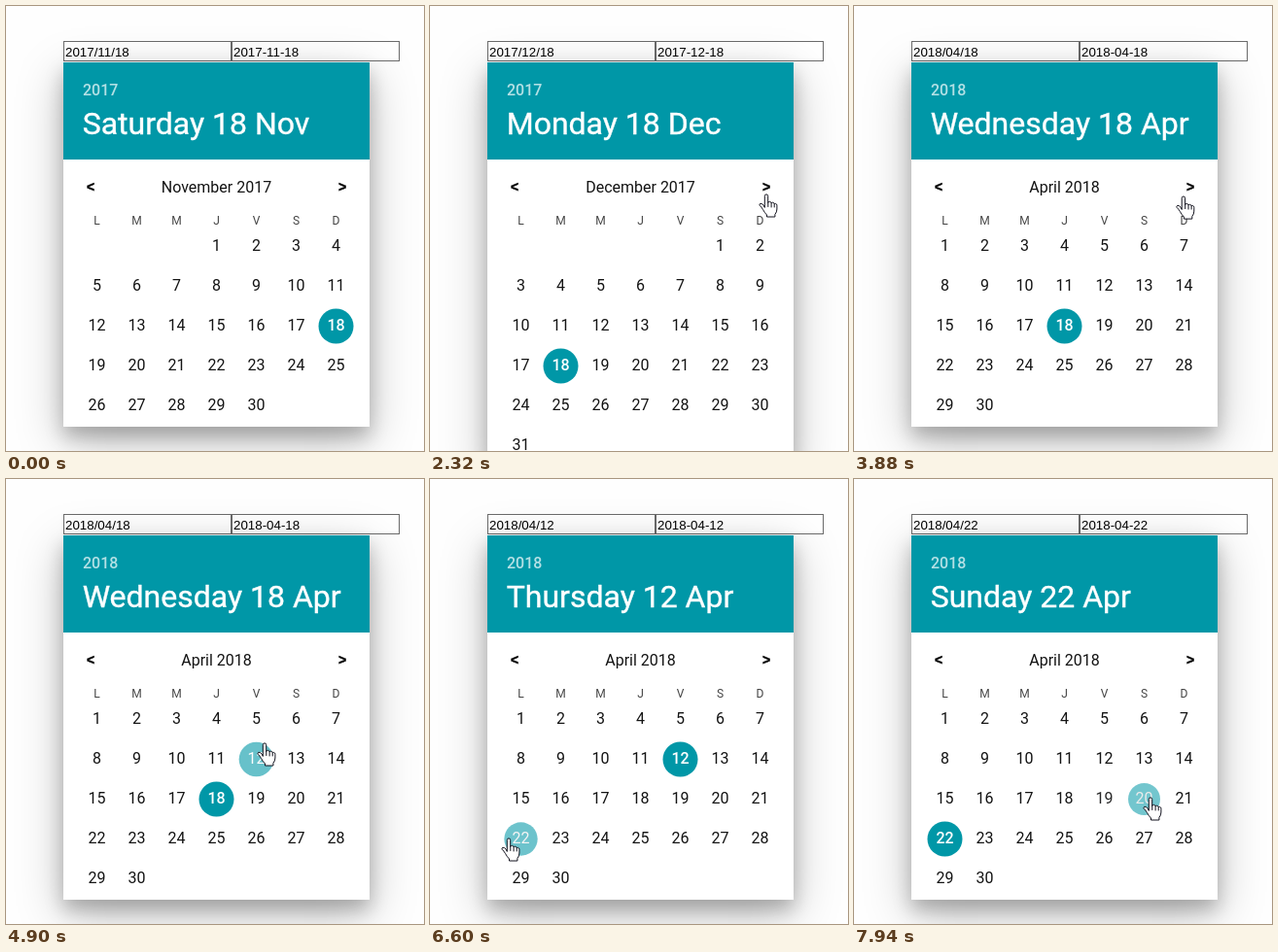
These frames come from a looping animation (430 px wide and 458 px high, 8 s). An HTML page:

```html
<!DOCTYPE html>
<html lang="en">
<head>
<meta charset="utf-8">
<title>Date picker</title>
<style>
  html, body { margin: 0; width: 100%; height: 100%; overflow: hidden; background: #fefefe; }
  #panel {
    position: absolute; left: 59px; top: 58px; width: 315px; background: #fff;
    box-shadow: 0 14px 45px rgba(0,0,0,.25), 0 10px 18px rgba(0,0,0,.22);
  }
  svg { position: absolute; left: 0; top: 0; }
  text { font: 16px Roboto, sans-serif; fill: #141414; }
  .mid { text-anchor: middle; }
  .field { font: 13.333px "Liberation Sans", Arial, sans-serif; fill: #000; }
  .box { fill: #fff; stroke: #6b6b6b; }
  .arrow { font: bold 14px "Liberation Sans", Arial, sans-serif; fill: #000; stroke: #000; stroke-width: .4; }
  .label { font-size: 12px; fill: #444; }
  #year { font-weight: 500; fill: #fff; opacity: .7; }
  #title { font-size: 32px; fill: #fff; stroke: #fff; stroke-width: .4; }
</style>
</head>
<body>
<svg width="430" height="458">
  <rect class="box" x="59.5" y="36.5" width="172" height="20"/>
  <rect class="box" x="232.5" y="36.5" width="172" height="20"/>
  <text class="field" id="slashed" x="61" y="52"/>
  <text class="field" id="dashed" x="234" y="52"/>
</svg>
<div id="panel"></div>
<svg width="430" height="458">
  <rect x="59" y="58" width="315" height="100" fill="#0097a7"/>
  <text id="year" x="79" y="92"/>
  <text id="title" x="78.7" y="132"/>
  <text class="mid" id="month" x="216.5" y="192"/>
  <text class="mid arrow" x="87" y="191">&lt;</text>
  <text class="mid arrow" x="346" y="191">&gt;</text>
  <g id="grid"/>
  <g id="hand" fill="#fff" stroke="#11111c" stroke-linejoin="round" stroke-linecap="round">
    <path d="M-1.7 13V1.6a1.7 1.7 0 0 1 3.4 0V8.5q.3-1.3 1.8-1.2 1.4.1 1.6 1.6.4-.8 1.6-.7 1.4.2 1.5 1.6.5-.6 1.4-.4 1.3.3 1.3 1.8V15q0 3-2 5.5V23H.5V21q-2-1.8-4-5.5-1.6-2.8-3.3-4.2-.8-1.4.6-2 1.6-.4 3 1.3z"/>
    <path fill="none" d="M1.8 8.5v4M5.1 9v4M8.2 10v3"/>
  </g>
</svg>
<script>
const LOOP = 8000, CELL = 41, LEFT = 73, TOP = 223, EASE = 65;
const nextClicks = [2320, 2550, 2790, 3090, 3340];

// time, x, y of the fingertip at each turn
const path = [
  [460, 325, 458], [1075, 318, 265], [1990, 346, 194], [3800, 346, 194], [3880, 339, 196],
  [4680, 266, 272], [5545, 266, 272], [6590, 81, 370], [7070, 81, 370], [7880, 305, 328]
];

const $ = id => document.getElementById(id);

function add(tag, attrs, text = '') {
  const el = document.createElementNS('http://www.w3.org/2000/svg', tag);
  for (const k in attrs) el.setAttribute(k, attrs[k]);
  el.textContent = text;
  return $('grid').appendChild(el);
}

[...'LMMJVSD'].forEach((c, i) =>
  add('text', { class: 'mid label', x: LEFT + 20.5 + i * CELL, y: 225 }, c));

const days = Array.from({ length: 31 }, (_, i) => ({
  dot: add('circle', { fill: '#0097a7' }),
  label: add('text', { class: 'mid' }, i + 1)
}));

const chosenDay = t => t < 5420 ? 18 : t < 7070 ? 12 : 22;
const monthStart = t => new Date(2017, 10 + nextClicks.filter(c => c <= t).length, 1);

function pointer(t) {
  if (t < path[0][0]) return null;
  const i = path.findIndex(p => p[0] > t);
  if (i < 0) return path.at(-1).slice(1);
  const [t0, x0, y0] = path[i - 1], [t1, x1, y1] = path[i];
  const k = (t - t0) / (t1 - t0);
  return [x0 + (x1 - x0) * k, y0 + (y1 - y0) * k];
}

function hoveredDay(t) {
  const p = pointer(t);
  if (!p) return 0;
  const col = Math.floor((p[0] - LEFT) / CELL), row = Math.floor((p[1] - TOP) / CELL);
  return row < 0 || col < 0 || col > 6 ? 0 : row * 7 + col - monthStart(t).getDay() + 1;
}

// Size and opacity of each day's dot, eased over the recent past
function dotLevels(t) {
  const start = Math.max(0, t - 900), steps = 90, dt = (t - start) / steps;
  const k = 1 - Math.exp(-dt / EASE), first = chosenDay(start);
  const levels = days.map((_, i) => i + 1 === first ? [1, 1] : [0, 0]);
  for (let n = 1; n <= steps; n++) {
    const s = start + n * dt, chosen = chosenDay(s), over = hoveredDay(s);
    levels.forEach((v, i) => {
      const d = i + 1, on = d === chosen || d === over;
      v[0] += ((on ? 1 : 0) - v[0]) * k;
      v[1] += ((d === chosen ? 1 : on ? .6 : 0) - v[1]) * k;
    });
  }
  return levels;
}

function draw(t) {
  const d = chosenDay(t), start = monthStart(t), first = start.getDay();
  const y = start.getFullYear(), m = start.getMonth();
  const date = new Date(y, m, d), count = new Date(y, m + 1, 0).getDate();
  const name = opts => date.toLocaleDateString('en-US', opts);
  const parts = [y, String(m + 1).padStart(2, '0'), d];

  $('slashed').textContent = parts.join('/');
  $('dashed').textContent = parts.join('-');
  $('year').textContent = y;
  $('title').textContent = `${name({ weekday: 'long' })} ${d} ${name({ month: 'short' })}`;
  $('month').textContent = `${name({ month: 'long' })} ${y}`;
  $('panel').style.height = 170 + CELL * Math.ceil((first + count) / 7) + 'px';

  const levels = dotLevels(t);
  days.forEach(({ dot, label }, i) => {
    const [size, alpha] = levels[i], slot = first + i;
    const x = LEFT + 20.5 + slot % 7 * CELL, row = Math.floor(slot / 7) * CELL;
    const shade = Math.round(20 + 235 * size);
    dot.setAttribute('cx', x);
    dot.setAttribute('cy', 247.5 + row);
    dot.setAttribute('r', 18 * size);
    dot.style.opacity = alpha;
    label.setAttribute('x', x);
    label.setAttribute('y', 252 + row);
    label.style.fill = `rgb(${shade},${shade},${shade})`;
    label.style.fontWeight = i + 1 === d ? 500 : 400;
    dot.style.display = label.style.display = i < count ? '' : 'none';
  });

  const p = pointer(t);
  $('hand').style.display = p ? '' : 'none';
  if (p) $('hand').setAttribute('transform', `translate(${p})`);
}

const begin = performance.now();
function tick() {
  draw((performance.now() - begin) % LOOP);
  requestAnimationFrame(tick);
}
tick();
</script>
</body>
</html>
```
